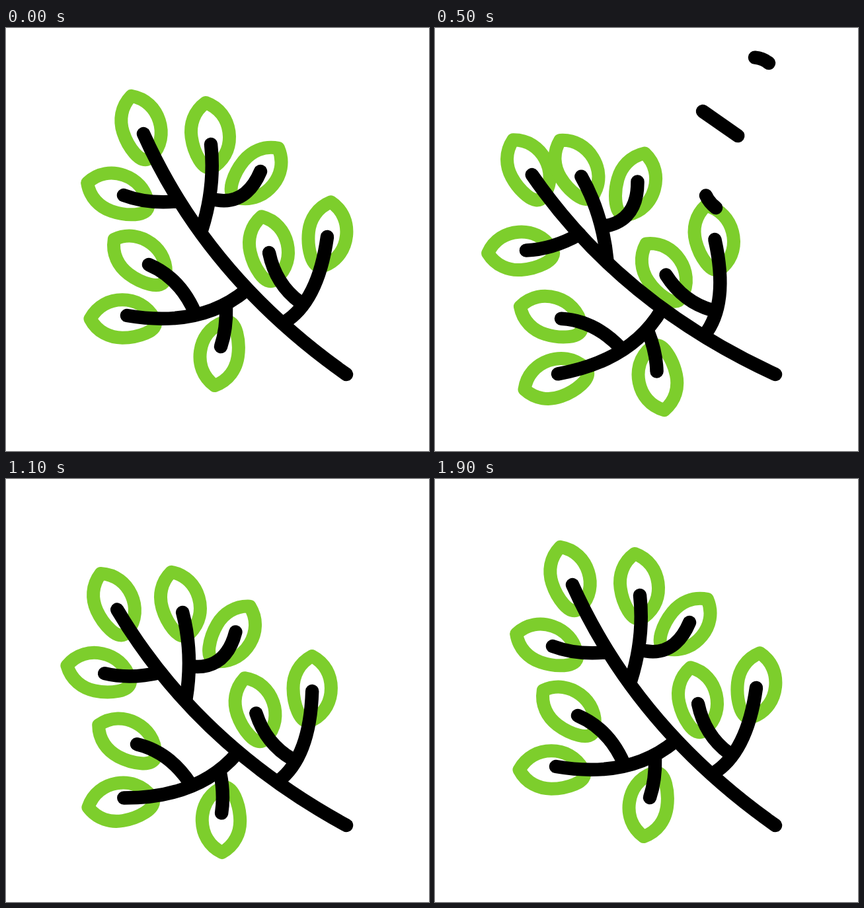
Animation of 640 by 640 pixels, one loop 2000 ms. Source, as an HTML page:

```html
<!DOCTYPE html>
<html lang="en">
<head>
<meta charset="utf-8">
<title>Branch in the wind</title>
<style>
  html, body { margin: 0; width: 100%; height: 100%; overflow: hidden; background: #fff; }
  svg { display: block; width: 100vw; height: 100vh; }
  path { fill: none; stroke-linecap: round; stroke-linejoin: round; }
  .stem { stroke: #000; stroke-width: 20.5; }
  .leaf { stroke: #7dce2c; stroke-width: 20; }
</style>
</head>
<body>
<svg id="stage" viewBox="0 0 640 640"></svg>
<script>
const LOOP = 2000, STEP = 100;
const LENS = 'M0-48.5C20-38 28.7-19 28.7 0S20 38 0 48.5S-28.7 19-28.7 0S-20-38 0-48.5Z';
const stage = document.getElementById('stage');

function add(parent, tag, attrs = {}) {
  const el = document.createElementNS('http://www.w3.org/2000/svg', tag);
  for (const k in attrs) el.setAttribute(k, attrs[k]);
  return parent.appendChild(el);
}

const leaf = (x, y, angle) => ({ x, y, angle });

// Side limbs settle on shared beats; only the start and the swings differ.
const sway = (start, ...swings) => {
  const beats = [430, 860, 1220, 1570, 1780, 1900];
  return [[start, 0], ...[...swings, -1, 0].map((v, i) => [beats[i], v])];
};

const trunk = {
  pivot: [515, 524],
  keys: [[0, 0], [358, -17.8], [781, 11], [1134, -7], [1482, 3.8], [1731, -1], [1900, 0]],
  stems: ['M515 524C383 431 276 312 208 160'],
  leaves: [leaf(204.5, 149, -18)]
};

const limbs = [
  {
    pivot: [260, 260],
    keys: sway(30, -14, 9.5, -3.8, 3.4),
    stems: ['M262 262Q215 267 178 253'],
    leaves: [leaf(169, 250, -71)]
  },
  {
    pivot: [296, 305],
    keys: sway(100, -14.6, 12, -6.5, 3),
    stems: ['M296 306Q317 240 310 176', 'M309 258C335 266 366 262 385 217'],
    leaves: [leaf(309, 161, -8), leaf(381.5, 219.5, 39)]
  },
  {
    pivot: [422, 446],
    keys: sway(135, -11.9, 15.6, -4.7, 6.1),
    stems: ['M420 446Q472 415 486 316', 'M445 415Q408 388 398 340'],
    leaves: [leaf(486.5, 311.5, 6), leaf(397.5, 332.5, -13)]
  },
  {
    pivot: [362, 396],
    keys: sway(175, -10.5, 8.5, -6.8, 5.6),
    stems: ['M363 397Q294 454 183 435', 'M286 431Q263 378 216 358', 'M333 422Q334 455 325 482'],
    leaves: [leaf(176, 440, -90), leaf(202.5, 349, -53), leaf(322.5, 493, 188)]
  }
];

const gusts = [
  { d: 'M521 163L456 117C436 103 434 84 447 64C458 42 488 39 505 53', head: 20, tail: 260 },
  { d: 'M531 249L467 204C450 193 429 195 414 213C402 232 404 256 425 272', head: 20, tail: 262 },
  { d: 'M530 213L405 126', head: 160, tail: 345 }
];
const GUST_TIME = 270;

// Every part has a leaf group and a stem group, so all leaves lie below all stems.
const leafLayer = add(stage, 'g'), stemLayer = add(stage, 'g');

function build(part, leafParent, stemParent) {
  const lg = add(leafParent, 'g'), sg = add(stemParent, 'g');
  part.groups = [lg, sg];
  for (const l of part.leaves)
    add(lg, 'path', { class: 'leaf', d: LENS, transform: `translate(${l.x} ${l.y}) rotate(${l.angle})` });
  for (const d of part.stems) add(sg, 'path', { class: 'stem', d });
}

build(trunk, leafLayer, stemLayer);
for (const limb of limbs) build(limb, ...trunk.groups);
for (const g of gusts) {
  g.el = add(stage, 'path', { class: 'stem', d: g.d });
  g.len = g.el.getTotalLength();
}

const clamp = v => Math.min(1, Math.max(0, v));

function valueAt(keys, t) {
  let v = keys[0][1];
  for (let i = 1; i < keys.length; i++) {
    const [t0, v0] = keys[i - 1], [t1, v1] = keys[i];
    if (t < t0) break;
    v = v0 + (v1 - v0) * (1 - Math.cos(Math.PI * clamp((t - t0) / (t1 - t0)))) / 2;
  }
  return v;
}

function pose(part, t) {
  const turn = `rotate(${valueAt(part.keys, t)} ${part.pivot.join(' ')})`;
  for (const g of part.groups) g.setAttribute('transform', turn);
}

function draw(t) {
  pose(trunk, t);
  for (const limb of limbs) pose(limb, t);
  for (const g of gusts) {
    const head = g.len * clamp((t - g.head) / GUST_TIME);
    const tail = g.len * clamp((t - g.tail) / GUST_TIME);
    const size = head - tail;
    g.el.style.display = size > 0.5 ? '' : 'none';
    g.el.setAttribute('stroke-dasharray', `${size} 2000`);
    g.el.setAttribute('stroke-dashoffset', -tail);
  }
}

const begin = performance.now();
function tick() {
  const t = (performance.now() - begin) % LOOP;
  draw(Math.floor(t / STEP) * STEP);
  requestAnimationFrame(tick);
}
tick();
</script>
</body>
</html>
```
